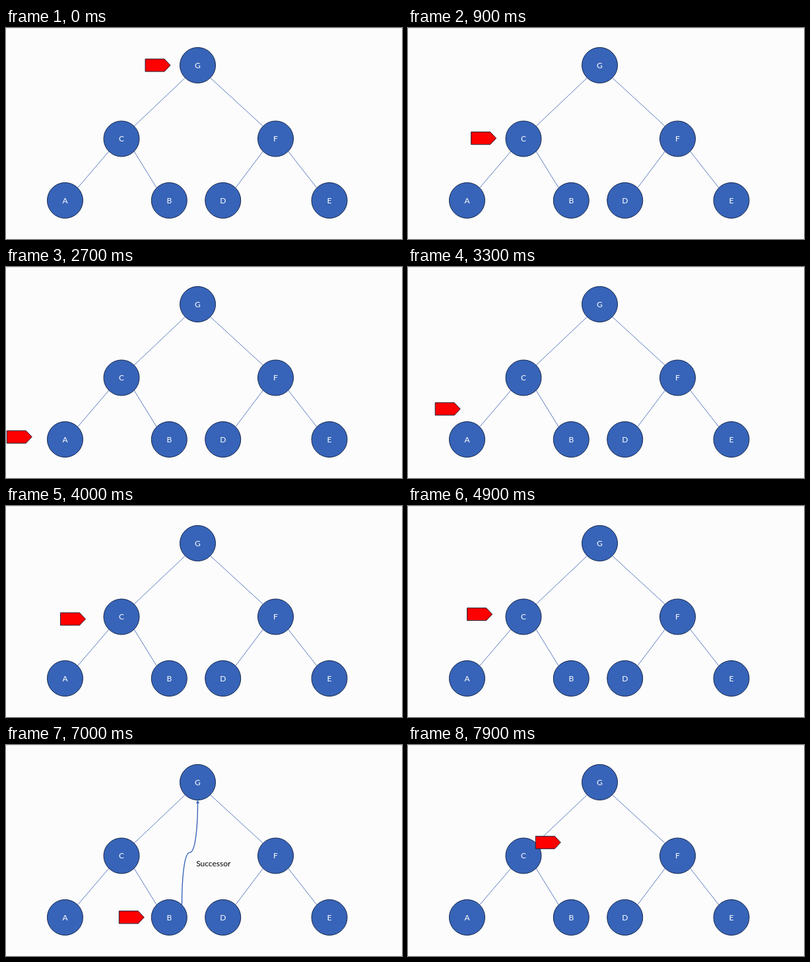
Write an HTML page that moves like this. It is 600 px wide and 320 px high and loops after 8 s.

```html
<!DOCTYPE html>
<html lang="en">
<head>
<meta charset="utf-8">
<title>Tree traversal</title>
<style>
  html, body { margin: 0; width: 100%; height: 100%; overflow: hidden; background: #fcfcfc; }
  svg { display: block; width: 600px; height: 320px; }
  text { font: 12px Lato, "Open Sans", sans-serif; text-anchor: middle; }
  #edges { stroke: #4f6fbb; stroke-width: .9; }
  #nodes circle { fill: #3764b8; stroke: #14264c; stroke-width: 1; }
  #nodes text { fill: #fff; }
  .link path { fill: none; stroke: #3c66b8; stroke-width: 1.4; }
  .link .head { fill: #3c66b8; stroke: none; }
  #pointer { fill: #f00; stroke: #1c2038; stroke-width: 1; }
</style>
</head>
<body>
<svg viewBox="0 0 600 320">
  <rect width="600" height="320" fill="#fcfcfc"/>
  <rect width="600" height="1" fill="#e6e6e6"/>
  <g id="edges"></g>
  <g id="nodes"></g>
  <g class="link" id="linkA">
    <path d="M117 261.5C149 261.5 175 232 175 199"/>
    <path class="head" d="M175 195l2.6 5h-5.2z"/>
    <text transform="translate(169.5 254) rotate(-45)" y="4">Successor</text>
  </g>
  <g class="link" id="linkB">
    <path d="M266.5 242C266.5 202 270 163 278.5 163S290.5 124 290.5 87"/>
    <path class="head" d="M290.5 83.5l2.6 5h-5.2z"/>
    <text x="314.3" y="183.7">Successor</text>
  </g>
  <path id="pointer" d="M0 0H29L38 9.5L29 19H0Z"/>
</svg>
<script>
const $ = id => document.getElementById(id);
const LOOP = 8000, MOVE = 1900;

const nodes = {
  G: [290.5, 56.5], C: [175, 168], F: [408.5, 168],
  A: [89.5, 261.5], B: [247.3, 261.5], D: [328.7, 261.5], E: [490, 261.5]
};
for (const [name, [x, y]] of Object.entries(nodes)) {
  $('nodes').innerHTML += `<circle cx="${x}" cy="${y}" r="27"/><text x="${x}" y="${y + 4.3}">${name}</text>`;
}

// Edges join the diagonal points of the circles.
for (const [from, to] of ['GC', 'GF', 'CA', 'CB', 'FD', 'FE']) {
  const [x1, y1] = nodes[from], [x2, y2] = nodes[to];
  const d = 19.1 * Math.sign(x2 - x1);
  $('edges').innerHTML += `<line x1="${x1 + d}" y1="${y1 + 19.1}" x2="${x2 - d}" y2="${y2 - 19.1}"/>`;
}

const stops = { G: [211, 47], A: [1, 248.5], C: [89.5, 154.5], B: [171.3, 251.8] };
const moves = [
  [150, 'G', 'A'], [2645, 'A', 'C'], [4860, 'C', 'B'], [7145, 'B', 'G']
];

// Cubic bezier easing (.3, 0, .35, 1), solved by bisection.
function ease(u) {
  let lo = 0, hi = 1, s = .5;
  for (let i = 0; i < 24; i++) {
    s = (lo + hi) / 2;
    const x = .9 * (1 - s) ** 2 * s + 1.05 * (1 - s) * s * s + s ** 3;
    if (x < u) lo = s; else hi = s;
  }
  return s * s * (3 - 2 * s);
}

function show(id, on) {
  $(id).setAttribute('visibility', on ? 'visible' : 'hidden');
}

function draw(t) {
  const [start, from, to] = moves.filter(m => m[0] <= t).pop() || moves[0];
  const p = ease(Math.min(1, Math.max(0, (t - start) / MOVE)));
  const [x, y] = stops[from].map((v, i) => v + (stops[to][i] - v) * p);
  $('pointer').setAttribute('transform', `translate(${x} ${y})`);
  show('linkA', t >= 1150 && t < 2650);
  show('linkB', t >= 5860 && t < 7150);
}

const begin = performance.now();
function tick() {
  draw((performance.now() - begin) % LOOP);
  requestAnimationFrame(tick);
}
tick();
</script>
</body>
</html>
```
